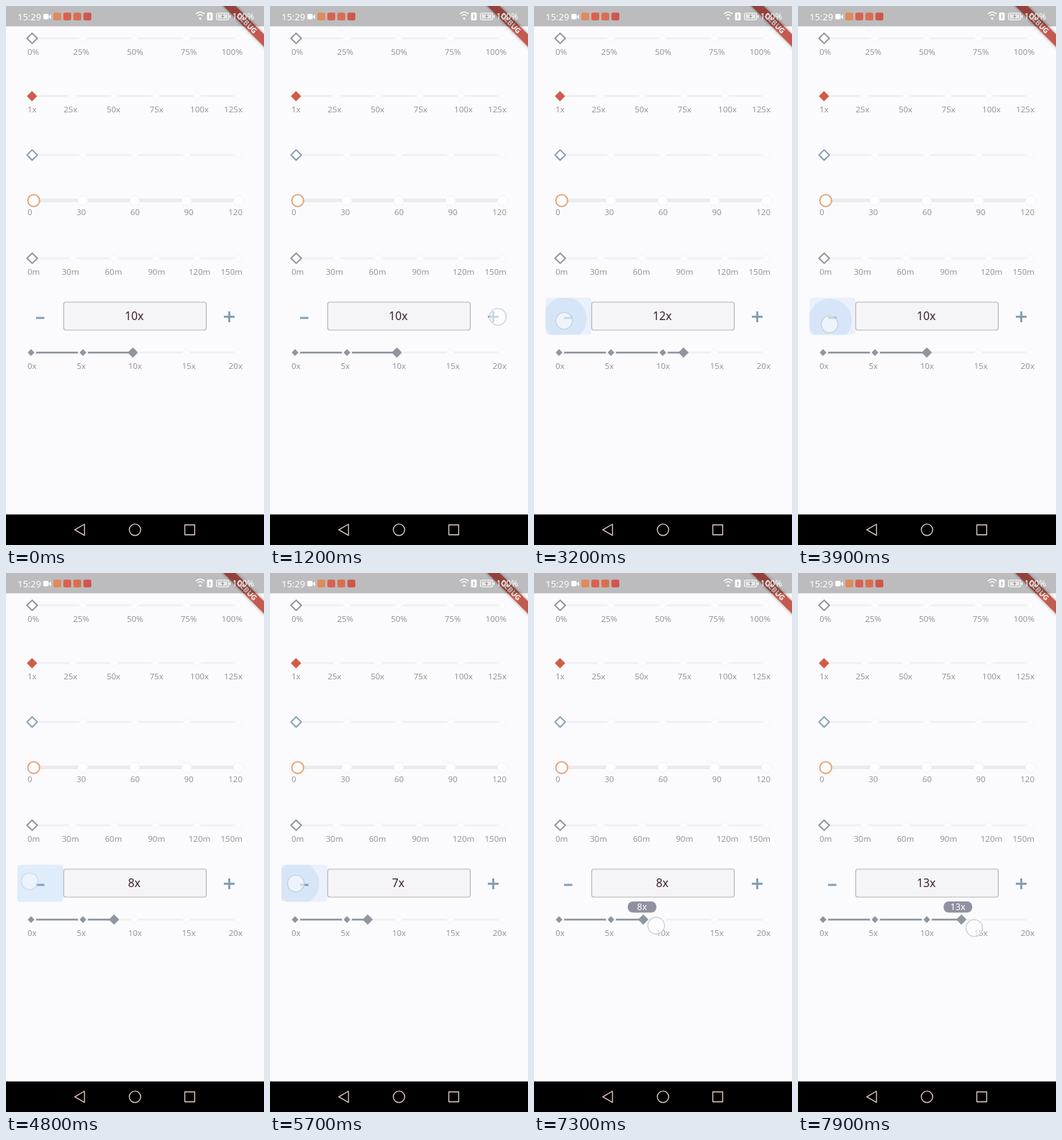
These frames come from a looping animation (360x750 px, 8 s). An HTML page:

```html
<!DOCTYPE html>
<html lang="en">
<head>
<meta charset="utf-8">
<title>Sliders</title>
<style>
html, body { margin: 0; width: 100%; height: 100%; overflow: hidden; background: #fbfafd; }
svg { display: block; width: 360px; height: 750px; font-family: "Noto Sans", "Open Sans", sans-serif; }
</style>
</head>
<body>
<svg id="stage" viewBox="0 0 360 750" xmlns="http://www.w3.org/2000/svg"></svg>
<script>
const NS = "http://www.w3.org/2000/svg";
const stage = document.getElementById("stage");
const BG = "#fbfafd", GREY = "#8f969f", BLUE = "#7f9db3";

function el(name, attrs, parent = stage) {
  const node = document.createElementNS(NS, name);
  set(node, attrs);
  parent.appendChild(node);
  return node;
}
function set(node, attrs) {
  for (const k in attrs) node.setAttribute(k, attrs[k]);
}
function text(str, x, y, size, fill, anchor = "middle", more = {}) {
  const node = el("text", { x, y, "font-size": size, fill, "text-anchor": anchor, ...more });
  node.textContent = str;
  return node;
}
function line(x1, x2, y, width, stroke) {
  return el("line", { x1, x2, y1: y, y2: y, "stroke-width": width, stroke });
}
const diamondPath = (x, y, r) => `M${x - r} ${y}L${x} ${y - r}L${x + r} ${y}L${x} ${y + r}Z`;
function diamond(x, y, r, attrs) {
  return el("path", { d: diamondPath(x, y, r), "stroke-linejoin": "round", ...attrs });
}
const clamp = v => Math.max(0, Math.min(1, v));
const ramp = (t, a, b) => clamp((t - a) / (b - a));

el("rect", { width: 360, height: 750, fill: BG });

function labels(list, y) {
  const last = list.length - 1;
  list.forEach((s, i) => {
    const anchor = i === 0 ? "start" : i === last ? "end" : "middle";
    text(s, 30 + 300 * i / last, y, 11.5, "#97969a", anchor);
  });
}
function track(y, count, width, round) {
  line(36, 330, y, width, width > 4 ? "#ebebee" : "#efeff2");
  for (let i = 1; i <= count; i++) {
    const x = 35 + 289.4 * i / count;
    if (round) el("circle", { cx: x, cy: y, r: 7, fill: "#fdfdff", stroke: "#f1f1f4" });
    else diamond(x, y, 5.5, { fill: "#fdfdff", stroke: "#f7f6f9", "stroke-width": 1.5 });
  }
}
const hollow = (y, stroke) => diamond(36.5, y, 7.2, { fill: "#fff", stroke, "stroke-width": 1.8 });

track(45, 4, 2.5);
labels(["0%", "25%", "50%", "75%", "100%"], 68);
hollow(45, "#8f9197");

track(125.3, 5, 2.5);
labels(["1x", "25x", "50x", "75x", "100x", "125x"], 148.3);
diamond(36.3, 125.5, 6.2, { fill: "#d05c47", stroke: "#d05c47", "stroke-width": 1.4 });

track(207.3, 4, 2.5);
hollow(207.3, "#7e9cae");

track(270.6, 4, 5, true);
labels(["0", "30", "60", "90", "120"], 291);
el("circle", { cx: 38.7, cy: 270.8, r: 8.2, fill: "#fff", stroke: "#e5a274", "stroke-width": 1.9 });

track(351, 5, 2.5);
labels(["0m", "30m", "60m", "90m", "120m", "150m"], 374);
hollow(351, "#8b9297");

// Stepper buttons with their ink
const defs = el("defs", {});
function button(x, fill) {
  const id = "clip" + x;
  const box = { x, y: 406, width: 64, height: 51.5, rx: 4 };
  el("rect", box, el("clipPath", { id }, defs));
  const glow = el("rect", { ...box, fill, opacity: 0 });
  const ink = el("circle", { fill: "#cfe1f7", opacity: 0, "clip-path": `url(#${id})` });
  return { glow, ink, cx: x + 32 };
}
const plus = button(281, "#e6f1fb");
const minus = button(16, "#e3eefc");
line(42, 53.5, 434, 2.8, BLUE);
line(304, 319, 432.4, 2.8, BLUE);
el("line", { x1: 311.5, x2: 311.5, y1: 425, y2: 440, stroke: BLUE, "stroke-width": 2.8 });

el("rect", { x: 80.5, y: 412, width: 199, height: 39, rx: 3, fill: "#f5f4f7", stroke: "#b6b6b9", "stroke-width": 1.2 });
const valueText = text("", 179, 437, 15.8, "#3a2226");

// Live slider
const LY = 482.2, xOf = v => 35 + v * 14.47;
track(LY, 4, 2.5);
labels(["0x", "5x", "10x", "15x", "20x"], 505.3);
const active = line(35, 35, LY, 2.6, GREY);
const dots = [0, 5, 10, 15, 20].map(v => ({
  x: xOf(v),
  node: diamond(xOf(v), LY, 6.2, { fill: GREY, stroke: BG, "stroke-width": 2 })
}));
const knob = diamond(0, LY, 6.4, { fill: GREY, stroke: GREY, "stroke-width": 1.2 });

const tip = el("g", {});
el("rect", { x: -20, y: 457, width: 40, height: 15.5, rx: 7.2, fill: "#9091a0" }, tip);
const tipText = text("", 0, 469.4, 12.6, "#fff");
tip.appendChild(tipText);

const touch = el("circle", { r: 11.6, fill: "#fff", "fill-opacity": .58, stroke: "#c5d2db", "stroke-width": 1.4 });

// Corner ribbon
const blur = el("filter", { id: "soft", x: "-20%", y: "-100%", width: "140%", height: "300%" }, defs);
el("feGaussianBlur", { stdDeviation: 2 }, blur);
const ribbon = el("g", { transform: "translate(360 0) rotate(45)" });
el("rect", { x: -44, y: 28, width: 88, height: 12, fill: "#000", opacity: .4, filter: "url(#soft)" }, ribbon);
el("rect", { x: -44, y: 28, width: 88, height: 12, fill: "#c4594f" }, ribbon);
ribbon.appendChild(text("DEBUG", 0, 37.7, 10.2, "#fff", "middle", { "font-weight": 800 }));

// Status bar
el("rect", { width: 360, height: 28.3, fill: "#000", opacity: .25 });
text("15:29", 16, 19.6, 13, "#fff", "start");
el("rect", { x: 52, y: 11, width: 7.5, height: 7.5, rx: 1.5, fill: "#fff" });
el("path", { d: "M60 14.2L63 12V18L60 15.8Z", fill: "#fff" });
["#e08a5a", "#d9624e", "#d8704e", "#d0554c"].forEach((fill, i) =>
  el("rect", { x: 66 + i * 14, y: 9.3, width: 11, height: 10.6, rx: 2, fill }));
[6.2, 3.6].forEach(r => el("path", {
  d: `M${271 - r} ${17.5 - r}Q271 ${15.5 - r * 1.6} ${271 + r} ${17.5 - r}`,
  fill: "none", stroke: "#fff", "stroke-width": 1.3
}));
el("circle", { cx: 271, cy: 17.6, r: 1.5, fill: "#fff" });
el("rect", { x: 280.5, y: 9, width: 8, height: 11, rx: 1.6, fill: "#fff" });
text("!", 284.5, 18, 9, "#aaa", "middle", { "font-weight": 700 });
el("rect", { x: 293.7, y: 10, width: 17, height: 9.2, rx: 2.2, fill: "none", stroke: "#fff", "stroke-width": 1.1 });
el("rect", { x: 295.6, y: 11.8, width: 13.2, height: 5.6, rx: 1, fill: "#fff", opacity: .65 });
el("path", { d: "M303 10.8L300 15H302L301 18.4L304.5 14H302.5Z", fill: "#999" });
el("rect", { x: 311.8, y: 12.8, width: 1.4, height: 3.6, fill: "#fff" });
text("100%", 331, 19.3, 11.9, "#fff");

// Navigation bar
el("rect", { y: 707.5, width: 360, height: 42.5, fill: "#000" });
const nav = { fill: "none", stroke: "#dfc6c0", "stroke-width": 1.4, "stroke-linejoin": "round" };
el("path", { d: "M96 728.8L109.5 721V736.6Z", ...nav });
el("circle", { cx: 180, cy: 728.8, r: 7.9, ...nav });
el("rect", { x: 249.5, y: 722, width: 13.8, height: 13.8, ...nav });

// time, direction, finger x, finger y
const taps = [
  [1200, 1, 318, 432.5], [1600, 1, 316, 434], [2000, 1, 317, 433],
  [3100, -1, 42, 438], [3450, -1, 43, 441], [3800, -1, 44, 443],
  [4250, -1, 38, 435], [4650, -1, 33, 429], [5600, -1, 36, 432]
];

function finger(x, y, opacity) {
  set(touch, { cx: x, cy: y, opacity });
}

function draw(t) {
  let value = 10, knobX = 177, glowPlus = 0, glowMinus = 0;
  let dragging = false;
  finger(0, 0, 0);
  set(plus.ink, { opacity: 0 });
  set(minus.ink, { opacity: 0 });

  for (const [at, dir, x, y] of taps) {
    const age = t - at;
    if (age < 0) continue;
    if (age >= 100) {
      value += dir;
      knobX = xOf(value);
    }
    const glow = ramp(age, 0, 150) * (1 - ramp(age, 300, 700));
    if (dir > 0) glowPlus = Math.max(glowPlus, glow);
    else glowMinus = Math.max(glowMinus, glow);
    if (age < 220) {
      finger(x, y, 1 - ramp(age, 110, 220));
      const b = dir > 0 ? plus : minus, k = ramp(age, 0, 250);
      set(b.ink, {
        cx: x + (b.cx - x) * k * .5, cy: y + (432 - y) * k * 1.2,
        r: 75 * k, opacity: .7 * ramp(age, 0, 60) * (1 - ramp(age, 100, 170))
      });
    }
  }

  if (t >= 7050) {
    const k = ramp(t, 7200, 7900);
    const x = 154.4 + 91.6 * k * (1.25 - .25 * k);
    finger(x, 490 + 4 * k, ramp(t, 7050, 7120));
    if (t >= 7200) {
      dragging = true;
      knobX = x - 18;
      value = Math.round((knobX - 35) / 14.47);
    }
  }

  set(plus.glow, { opacity: glowPlus });
  set(minus.glow, { opacity: glowMinus });
  valueText.textContent = tipText.textContent = value + "x";
  set(active, { x2: knobX });
  set(knob, { d: diamondPath(knobX, LY, 6.4) });
  for (const d of dots) set(d.node, { visibility: d.x < knobX - 1 ? "visible" : "hidden" });
  set(tip, { transform: `translate(${xOf(value)} 0)`, visibility: dragging ? "visible" : "hidden" });
}

const start = performance.now();
function tick() {
  draw((performance.now() - start) % 8000);
  requestAnimationFrame(tick);
}
draw(0);
requestAnimationFrame(tick);
</script>
</body>
</html>
```
